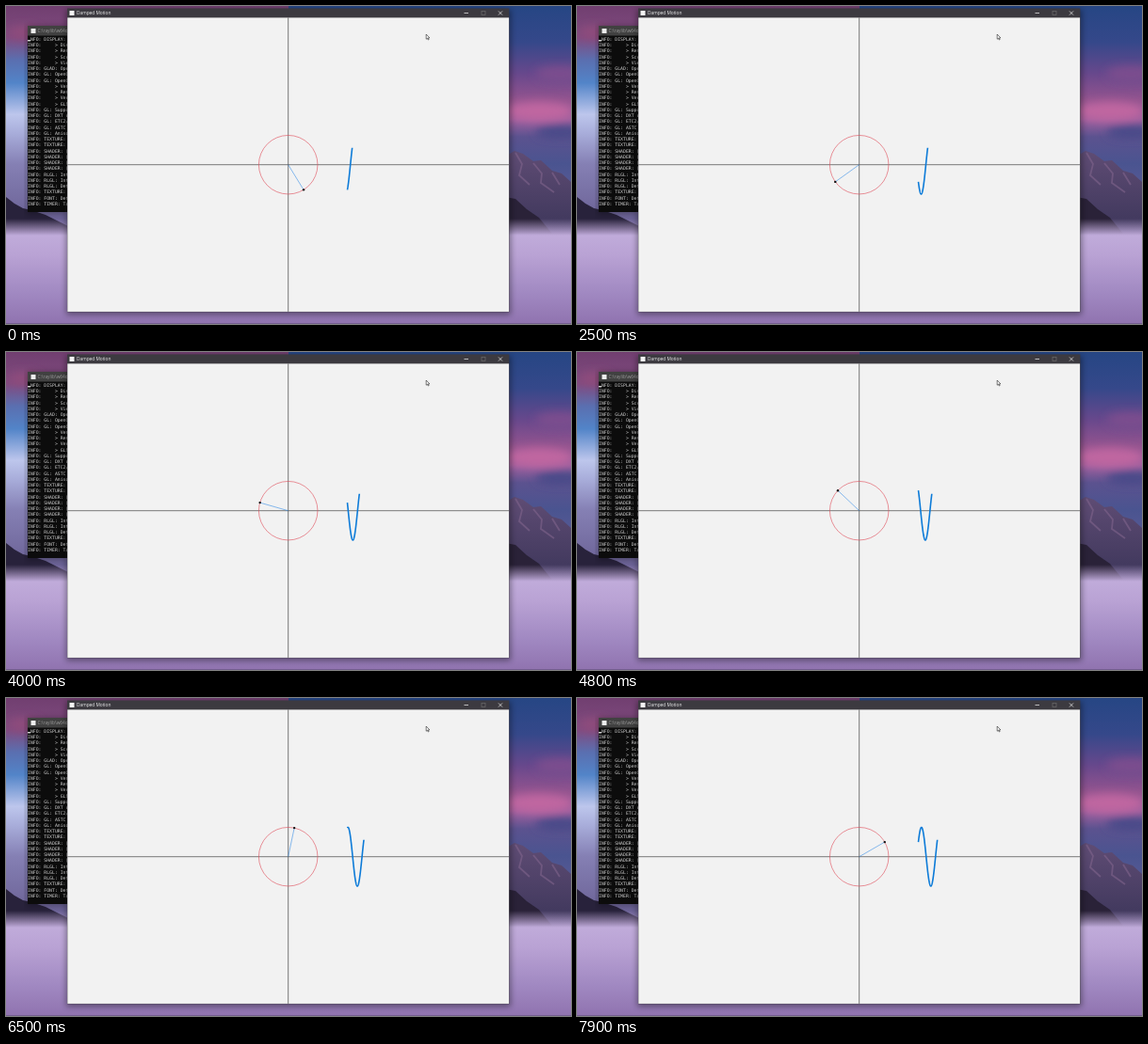
An HTML page for the animation above (8000 ms loop, 600 by 338 pixels).

```html
<!DOCTYPE html>
<html lang="en">
<head>
<meta charset="utf-8">
<title>Damped Motion</title>
<style>
  html, body { margin: 0; width: 100%; height: 100%; overflow: hidden; background: #8d72b2; }
  svg { display: block; width: 100vw; height: 100vh; }
  .mono { font: 4.8px "DejaVu Sans Mono", "Liberation Mono", monospace; fill: #d2d2d2; white-space: pre; }
  .title { font: 4.8px "Open Sans", "Noto Sans", sans-serif; }
</style>
</head>
<body>
<svg viewBox="0 0 600 338" preserveAspectRatio="none">
  <defs>
    <linearGradient id="skyLeft" gradientUnits="userSpaceOnUse" x1="0" y1="0" x2="0" y2="240">
      <stop offset="0" stop-color="#713f70"/>
      <stop offset=".14" stop-color="#804b80"/>
      <stop offset=".24" stop-color="#5a6fb0"/>
      <stop offset=".34" stop-color="#5284c8"/>
      <stop offset=".48" stop-color="#bdc6ec"/>
      <stop offset=".56" stop-color="#a9aedb"/>
      <stop offset=".7" stop-color="#8580b4"/>
      <stop offset="1" stop-color="#665c90"/>
    </linearGradient>
    <linearGradient id="skyRight" gradientUnits="userSpaceOnUse" x1="0" y1="0" x2="0" y2="240">
      <stop offset="0" stop-color="#264684"/>
      <stop offset=".16" stop-color="#35488a"/>
      <stop offset=".3" stop-color="#68488c"/>
      <stop offset=".42" stop-color="#94548f"/>
      <stop offset=".5" stop-color="#a0609f"/>
      <stop offset=".58" stop-color="#5b528f"/>
      <stop offset=".7" stop-color="#4a5490"/>
      <stop offset="1" stop-color="#6c629c"/>
    </linearGradient>
    <linearGradient id="fog" x2="0" y2="1">
      <stop offset="0" stop-color="#bca5d5" stop-opacity="0"/>
      <stop offset=".16" stop-color="#c0abda"/>
      <stop offset=".35" stop-color="#b9a2d4"/>
      <stop offset=".7" stop-color="#a189c2"/>
      <stop offset="1" stop-color="#9073af"/>
    </linearGradient>
    <linearGradient id="rock" x2="0" y2="1">
      <stop offset="0" stop-color="#5f4c74"/>
      <stop offset="1" stop-color="#3b3559"/>
    </linearGradient>
    <filter id="soft" x="-50%" y="-50%" width="200%" height="200%"><feGaussianBlur stdDeviation="5"/></filter>
    <filter id="shade" x="-5%" y="-5%" width="110%" height="110%"><feGaussianBlur stdDeviation="3"/></filter>
    <clipPath id="consoleClip"><rect x="23" y="21" width="42.5" height="198"/></clipPath>
  </defs>

  <rect width="300" height="250" fill="url(#skyLeft)"/>
  <rect x="300" width="300" height="250" fill="url(#skyRight)"/>
  <g filter="url(#soft)">
    <ellipse cx="20" cy="28" rx="18" ry="7" fill="#8f4c7c"/>
    <ellipse cx="588" cy="72" rx="26" ry="8" fill="#7b4d8e"/>
    <ellipse cx="566" cy="112" rx="36" ry="10" fill="#c066a0"/>
    <ellipse cx="590" cy="134" rx="28" ry="7" fill="#474a88"/>
  </g>

  <path d="M530 160L540 154 549 157 560 165 568 164 580 175 590 178 600 187V245H530Z" fill="url(#rock)"/>
  <path d="M541 156L548 168 545 180 556 190M560 167L569 178 568 188 582 198M580 177L588 190" fill="none" stroke="#80658c" stroke-width="1.8" opacity=".6"/>
  <path d="M530 203L541 205 553 216 566 225 580 242H530Z" fill="#2a2238"/>
  <path d="M0 203L9 210 18 215 27 217 42 222 66 234V248H0Z" fill="#28223b"/>
  <rect y="226" width="600" height="112" fill="url(#fog)"/>
  <rect y="337" width="600" height="1" fill="#5b4a70" opacity=".5"/>

  <rect x="22" y="21" width="44" height="200" fill="#000" opacity=".3" filter="url(#shade)"/>
  <g clip-path="url(#consoleClip)">
    <rect x="23" y="21" width="43" height="198" fill="#0c0c0c"/>
    <rect x="23" y="21" width="43" height="10.5" fill="#414141"/>
    <rect x="26.5" y="24" width="5" height="5" fill="#eee"/>
    <text class="title" x="33.5" y="28" fill="#999">C:\raylib\w64devkit</text>
    <g id="log"></g>
    <rect x="23" y="36.2" width="3" height="1.2" fill="#fff"/>
  </g>

  <rect x="64" y="4" width="472" height="324" fill="#000" opacity=".4" filter="url(#shade)"/>
  <rect x="65" y="2.5" width="469.4" height="322.7" fill="#3c3a40"/>
  <rect x="65.3" y="12.4" width="468.8" height="312.5" fill="#f2f2f2"/>
  <rect x="67.5" y="5" width="5" height="5" fill="#f5f5f5"/>
  <text class="title" x="75" y="9.3" fill="#eee">Damped Motion</text>
  <g fill="none" stroke="#ddd" stroke-width=".8">
    <path d="M486.5 7.5h4.5M523 5.5l4 4M527 5.5l-4 4"/>
    <rect x="505" y="5.5" width="4" height="4" stroke="#666"/>
  </g>

  <path d="M299.7 12.4V324.9M65.3 168.7H534.1" stroke="#505050" stroke-width=".75" fill="none"/>
  <circle cx="299.7" cy="168.7" r="31.25" fill="none" stroke="#e04a58" stroke-width=".6"/>
  <line id="arm" x1="299.7" y1="168.7" stroke="#2a86e6" stroke-width=".55"/>
  <circle id="dot" r="1.2" fill="#111"/>
  <path id="wave" fill="none" stroke="#0d7bd8" stroke-width="1.6" stroke-linejoin="round"/>
  <path d="M446.2 30v5.2l1.2-1 .9 1.8.8-.4-.8-1.7h1.6z" fill="#fff" stroke="#222" stroke-width=".6"/>
</svg>
<script>
const LOOP = 8000, STEP = 100;
const CX = 299.7, CY = 168.7, RADIUS = 31.25;
const SPEED = 0.6, START_ANGLE = 1.02;
const WAVE_X = 362.5, DRIFT = 1.9, WAVE_START = -2.72;

const logLines = [
  " NFO: DISPLAY:", "    > Disp", "    > Rend", "    > Scre", "    > View",
  "GLAD: Open", "GL: OpenGL", "GL: OpenGL", "    > Vend", "    > Rend", "    > Vers", "    > GLSL",
  "GL: Suppor", "GL: DXT co", "GL: ETC2/E", "GL: ASTC c", "GL: Anisot",
  "TEXTURE: [", "TEXTURE: [", "SHADER: [I", "SHADER: [I", "SHADER: [I", "SHADER: [I",
  "RLGL: Inte", "RLGL: Inte", "RLGL: Defa", "TEXTURE: [", "FONT: Defa", "TIMER: Tar"
];
const byId = id => document.getElementById(id);

logLines.forEach((line, i) => {
  const text = document.createElementNS("http://www.w3.org/2000/svg", "text");
  text.setAttribute("class", "mono");
  text.setAttribute("x", 23);
  text.setAttribute("y", 36.8 + i * 6.25);
  text.textContent = i ? "INFO: " + line : line;
  byId("log").append(text);
});

const angleAt = t => START_ANGLE + SPEED * t;
const heightAt = t => CY + RADIUS * Math.sin(angleAt(t));

function draw(t) {
  const x = CX + RADIUS * Math.cos(angleAt(t)), y = heightAt(t);
  byId("arm").setAttribute("x2", x);
  byId("arm").setAttribute("y2", y);
  byId("dot").setAttribute("cx", x);
  byId("dot").setAttribute("cy", y);

  const points = [], count = 100;
  for (let i = 0; i <= count; i++) {
    const age = (t - WAVE_START) * i / count;
    points.push(`${(WAVE_X + DRIFT * age).toFixed(2)} ${heightAt(t - age).toFixed(2)}`);
  }
  byId("wave").setAttribute("d", "M" + points.join("L"));
}

const origin = performance.now();
function tick() {
  const elapsed = (performance.now() - origin) % LOOP;
  draw(Math.floor(elapsed / STEP) * STEP / 1000);
  requestAnimationFrame(tick);
}
tick();
</script>
</body>
</html>
```
